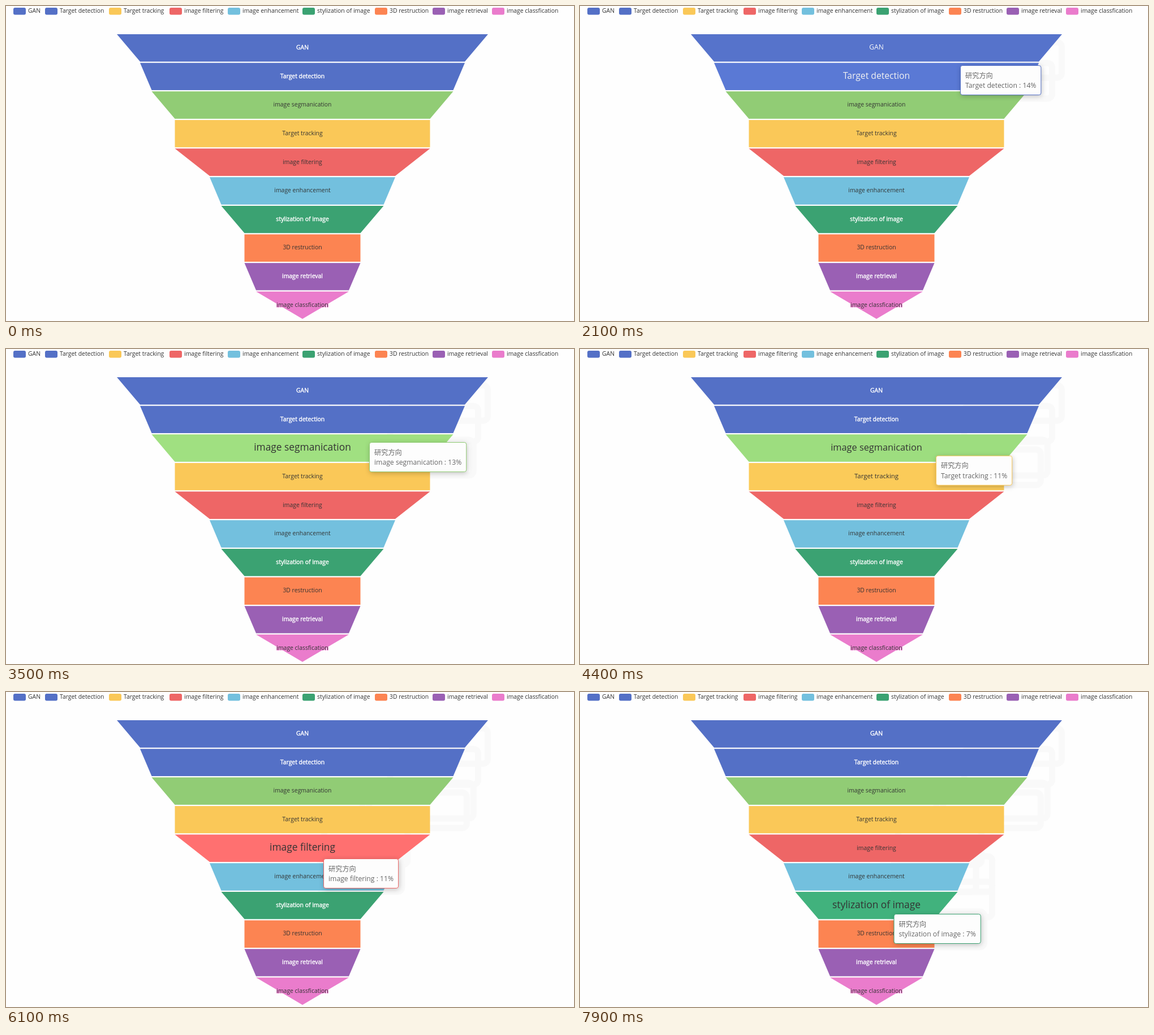
Recreate the animation shown at these times as an HTML page with a canvas. Size 1004 by 558 pixels, loop 8000 ms.

```html
<!DOCTYPE html>
<html lang="en">
<head>
<meta charset="utf-8">
<title>Funnel chart</title>
<style>
  html, body { margin: 0; width: 100%; height: 100%; overflow: hidden; background: #fefefe; }
  canvas { display: block; }
</style>
</head>
<body>
<canvas id="stage" width="1004" height="558"></canvas>
<script>
const ctx = document.getElementById('stage').getContext('2d');
const FONT = '"Open Sans", "Noto Sans CJK SC", "Noto Sans CJK", sans-serif';
const LOOP = 8000, STEP = 100;
const CENTER = 524, TOP = 50, PITCH = 50.65, HEIGHT = 48.4, UNIT = 41;
const LABEL = 10.4, LABEL_HOVER = LABEL * 5 / 3;
const TIP_FONT = 12.2, TIP_PAD = 9, TIP_HEIGHT = 53;
const WHITE = [255, 255, 255], PALE = [238, 238, 238], DARK = [51, 51, 51];

// name, percent, colour, legend x, light label
const rows = [
  ['GAN', 16, [84, 112, 198], 13, true],
  ['Target detection', 14, [84, 112, 198], 69, true],
  ['image segmanication', 13, [145, 204, 117], null, false],
  ['Target tracking', 11, [250, 200, 88], 182, false],
  ['image filtering', 11, [238, 102, 102], 289, false],
  ['image enhancement', 8, [115, 192, 222], 392, false],
  ['stylization of image', 7, [59, 162, 114], 524, true],
  ['3D restruction', 5, [252, 132, 82], 652, false],
  ['image retrieval', 5, [154, 96, 180], 754, true],
  ['image classfication', 4, [234, 124, 204], 859, false]
].map(([name, value, color, legendX, light]) => ({ name, value, color, legendX, light }));

// moment at which the pointer enters each of the first rows
const enterTimes = [640, 1985, 3185, 4385, 5585, 6485, 7385];

// tooltip path: time, left, top
const path = [
  [700, 768, 68], [1200, 685, 91], [1900, 685, 91], [2000, 685, 105], [2100, 672, 105],
  [2500, 648, 130], [3100, 648, 130], [3400, 648, 165], [3500, 642, 165], [3900, 636, 182],
  [4250, 636, 182], [5000, 568.5, 247], [5450, 568.5, 247], [6100, 561, 295],
  [6350, 561.5, 295], [6800, 561.5, 340], [7250, 561.5, 340], [7900, 554.5, 393]
];

// faint shadow remains: time, left, top, row
const remains = [
  [800, 768, 68, 0], [2000, 685, 105, 1], [3400, 648, 165, 2], [3900, 636, 182, 2],
  [5000, 568.5, 247, 3], [6100, 561, 295, 4], [6500, 561.5, 295, 5],
  [6800, 561.5, 340, 5], [7900, 554.5, 393, 6]
];

const clamp = v => Math.max(0, Math.min(1, v));
const cubicOut = v => 1 - (1 - clamp(v)) ** 3;
const smooth = v => v * v * (3 - 2 * v);
const mix = (a, b, k) => a + (b - a) * k;
const mixColor = (a, b, k) => a.map((v, i) => mix(v, b[i], k));
const css = c => `rgb(${c.map(v => Math.min(255, Math.round(v))).join(',')})`;
const lift = c => c.map(v => Math.min(255, v * 1.1));

function setFont(size) {
  ctx.font = `${size}px ${FONT}`;
}

function roundRect(x, y, w, h, r) {
  ctx.beginPath();
  ctx.roundRect(x, y, w, h, r);
}

const tipText = row => `${row.name} : ${row.value}%`;

function tipWidth(row) {
  setFont(TIP_FONT);
  return ctx.measureText(tipText(row)).width + 2 * TIP_PAD;
}

function hoverAmount(index, t) {
  if (index >= enterTimes.length) return 0;
  const fade = start => start === undefined ? 0 : cubicOut((t - start) / 300);
  return fade(enterTimes[index]) - fade(enterTimes[index + 1]);
}

function tipPosition(t) {
  const next = path.findIndex(p => p[0] > t);
  if (next < 0) return path[path.length - 1].slice(1);
  if (next === 0) return path[0].slice(1);
  const [t0, x0, y0] = path[next - 1], [t1, x1, y1] = path[next];
  const k = smooth((t - t0) / (t1 - t0));
  return [mix(x0, x1, k), mix(y0, y1, k)];
}

function drawRemains(t) {
  ctx.strokeStyle = '#f9f9f9';
  ctx.lineWidth = 11;
  for (const [start, x, y, index] of remains) {
    if (t < start) continue;
    const w = tipWidth(rows[index]);
    roundRect(x - 6, y - 4, w + 12, TIP_HEIGHT + 10, 8);
    ctx.stroke();
  }
}

function drawLegend() {
  setFont(LABEL);
  ctx.textAlign = 'left';
  for (const row of rows) {
    if (row.legendX === null) continue;
    ctx.fillStyle = css(row.color);
    roundRect(row.legendX, 3, 22, 12.5, 3);
    ctx.fill();
    ctx.fillStyle = css(DARK);
    ctx.fillText(row.name, row.legendX + 26, 12.3);
  }
}

function drawRow(row, index, t) {
  const k = hoverAmount(index, t);
  const y = TOP + index * PITCH;
  const upper = row.value * UNIT / 2;
  const lower = index + 1 < rows.length ? rows[index + 1].value * UNIT / 2 : 0;
  const fill = css(mixColor(row.color, lift(row.color), k));

  ctx.fillStyle = fill;
  ctx.beginPath();
  ctx.moveTo(CENTER - upper, y);
  ctx.lineTo(CENTER + upper, y);
  ctx.lineTo(CENTER + lower, y + HEIGHT);
  ctx.lineTo(CENTER - lower, y + HEIGHT);
  ctx.fill();

  const size = mix(LABEL, LABEL_HOVER, k);
  const baseline = y + HEIGHT / 2 + size * 0.26;
  const hoverColor = index < 2 ? PALE : DARK;
  const color = css(mixColor(row.light ? WHITE : DARK, hoverColor, k));
  setFont(size);
  ctx.textAlign = 'center';
  ctx.lineJoin = 'round';
  ctx.lineWidth = 2;
  ctx.strokeStyle = fill;
  ctx.strokeText(row.name, CENTER, baseline);
  ctx.fillStyle = color;
  ctx.fillText(row.name, CENTER, baseline);
  if (row.light && k < 0.1) {
    ctx.lineWidth = 0.4;
    ctx.strokeStyle = color;
    ctx.strokeText(row.name, CENTER, baseline);
  }
}

function drawTooltip(t) {
  const index = enterTimes.filter(start => start <= t).length - 1;
  if (index < 0) return;
  const row = rows[index];
  const [x, y] = tipPosition(t);
  const w = tipWidth(row);

  ctx.save();
  ctx.globalAlpha = clamp((t - enterTimes[0]) / 200);
  roundRect(x + 0.5, y + 0.5, w - 1, TIP_HEIGHT - 1, 3.5);
  ctx.save();
  ctx.shadowColor = 'rgba(0,0,0,0.25)';
  ctx.shadowBlur = 10;
  ctx.shadowOffsetX = 1;
  ctx.shadowOffsetY = 2;
  ctx.fillStyle = '#fdfdfd';
  ctx.fill();
  ctx.restore();
  ctx.lineWidth = 1;
  ctx.strokeStyle = css(row.color);
  ctx.stroke();

  setFont(TIP_FONT);
  ctx.textAlign = 'left';
  ctx.fillStyle = '#666';
  ctx.fillText('研究方向', x + TIP_PAD, y + 22.5);
  ctx.fillText(tipText(row), x + TIP_PAD, y + 40);
  ctx.restore();
}

function draw(now) {
  const t = Math.floor((now % LOOP) / STEP) * STEP;
  ctx.fillStyle = '#fefefe';
  ctx.fillRect(0, 0, 1004, 558);
  drawRemains(t);
  drawLegend();
  rows.forEach((row, index) => drawRow(row, index, t));
  drawTooltip(t);
}

const started = performance.now();
function tick() {
  draw(performance.now() - started);
  requestAnimationFrame(tick);
}
tick();
</script>
</body>
</html>
```
